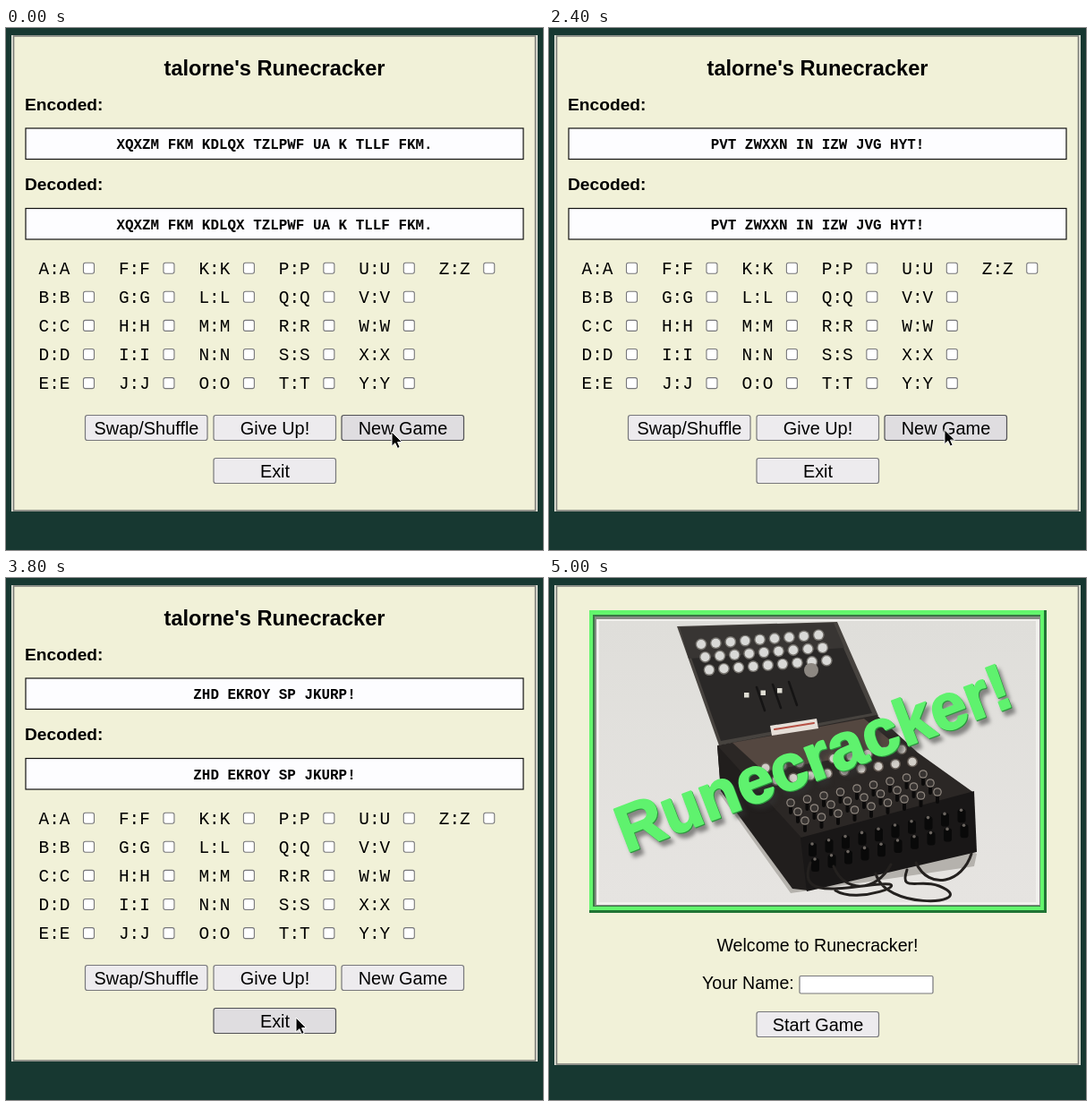
An HTML page for the animation above (5100 ms loop, 600x583 px).

```html
<!DOCTYPE html>
<html lang="en">
<head>
<meta charset="utf-8">
<title>Runecracker</title>
<style>
html, body { margin: 0; width: 100%; height: 100%; overflow: hidden; background: #173831; }
svg { display: block; }
text { font: 19.6px "Liberation Sans", Arial, sans-serif; white-space: pre; }
.mid { text-anchor: middle; }
.title { font-size: 23.6px; font-weight: bold; }
.head { font-size: 19.2px; font-weight: bold; }
.mono { font-family: "Liberation Mono", "Courier New", monospace; font-size: 19.4px; }
.code { font-size: 15.92px; font-weight: bold; }
.btn rect { fill: #edebee; stroke: #77777b; stroke-width: 1.2; }
.btn text { font-size: 19.9px; }
.btn.hover rect { fill: #dfdde0; stroke: #505054; }
.btn.press rect { fill: #f4f2f6; stroke: #8c8c90; }
.logo { font-size: 73px; font-weight: bold; stroke-width: 2; stroke-linejoin: round; }
</style>
</head>
<body>
<svg id="stage" width="600" height="583" viewBox="0 0 600 583"></svg>
<script>
const text = (x, y, s, cls = '') => `<text x="${x}" y="${y}" class="${cls}">${s}</text>`;
const rect = (x, y, w, h, fill, more = '') =>
  `<rect x="${x}" y="${y}" width="${w}" height="${h}" fill="${fill}" ${more}/>`;
const poly = (points, fill) => `<polygon points="${points}" fill="${fill}"/>`;
const dot = (x, y, r, fill) => `<circle cx="${x}" cy="${y}" r="${r}" fill="${fill}"/>`;
const line = (d, color, width) =>
  `<path d="${d}" fill="none" stroke="${color}" stroke-width="${width}" stroke-linecap="round"/>`;
const repeat = (n, draw) => Array.from({ length: n }, (_, i) => draw(i)).join('');

const button = (id, x, y, label) => `<g id="${id}" class="btn">
  ${rect(x, y, 136.5, 28, '', 'rx="2.5"')}${text(x + 68.5, y + 21, label, 'mid')}</g>`;

const panel = h => rect(6, 8, 588, h, '#e4e5da')
  + rect(8.5, 9, 583, h - 2, '#f1f1d8', 'stroke="#7c7d78" stroke-width="1.6"');

const field = y => rect(22, y, 556, 34.5, '#fdfdff', 'stroke="#111" stroke-width="1.2"')
  + text(300, y + 23, '', 'mono code mid');

const letter = i => {
  const x = 36.5 + 89.45 * Math.floor(i / 5), y = 275 + 32.1 * (i % 5);
  const c = String.fromCharCode(65 + i);
  return text(x, y, c + ':' + c, 'mono')
    + rect(x + 50, y - 12.8, 12, 12, '#fff', 'rx="2.2" stroke="#77777a" stroke-width="1.1"');
};

const game = panel(532)
  + text(300, 53, "talorne's Runecracker", 'title mid')
  + text(21, 92, 'Encoded:', 'head') + field(112)
  + text(21, 181, 'Decoded:', 'head') + field(201.5)
  + repeat(26, letter)
  + button('swap', 88.5, 432.5, 'Swap/Shuffle') + button('give', 232, 432.5, 'Give Up!')
  + button('next', 375, 432.5, 'New Game') + button('exit', 232, 480.5, 'Exit');

// Keys of the machine lie in slanted rows
const keys = (rows, cols, x, y, dx, dy, sx, sy, draw) => repeat(rows, r => repeat(cols, c =>
  draw(x + c * dx + r * sx, y + c * dy + r * sy)));

const machine =
  poly('270,352 475,322 478,308 440,292 190,240', '#b5b2ad')
  + poly('143,54 322,49 368,154 190,187', '#47433f')
  + poly('148,58 318,53 361,151 192,182', '#2a2827')
  + poly('146,55 318,50 330,78 156,90', '#383533')
  + keys(3, 9, 170, 74, 16.4, -1.3, 4.5, 14.3, (x, y) =>
      dot(x, y, 6.4, '#77746f') + dot(x, y, 5, '#d9d9d7'))
  + dot(293, 103, 8, '#8d8882')
  + repeat(3, i => rect(218 + i * 18.5, 128 - i * 2.5, 5.5, 5.5, '#e0ded4')
      + line(`M${232 + i * 18} ${122 - i * 3}l9 26`, '#151414', 2.5))
  + poly('188,187 366,153 412,195 475,240 282,292 192,238', '#2b2725')
  + poly('188,187 282,290 290,349 272,347 192,238', '#211e1d')
  + poly('281,290 475,238 478,306 288,350', '#191717')
  + poly('205,184 352,157 392,190 240,216', '#544740')
  + poly('247,165 299,157 301,168 249,176', '#e6dfd8')
  + line('M252 169L296 162', '#b75145', 2)
  + keys(2, 9, 242, 212, 19, -2.6, 12, 14, (x, y) =>
      dot(x, y, 6, '#665d56') + dot(x, y, 4.5, '#d2cec8'))
  + keys(3, 9, 270, 251, 18.5, -4, 8, 10, (x, y) =>
      line(`M${x} ${y + 3}v8`, '#0b0a0a', 4) + dot(x, y, 4.8, '#918981') + dot(x, y, 3.6, '#373331'))
  + keys(2, 10, 294, 302, 18.5, -4.2, 3, 17, (x, y) =>
      rect(x - 4, y - 6, 9, 15, '#090909', 'rx="3"') + dot(x, y - 5, 1.8, '#6c6661'))
  + line('M292 318C276 360 330 345 370 342S345 365 320 349M365 330C375 370 470 365 444 348S390 355 400 326'
      + 'M318 322C330 352 365 352 382 320M410 318C425 350 462 340 472 308', '#24211f', 3);

const logo = (color, dx) => `<text class="logo" transform="translate(${86 + dx} ${307 + dx}) rotate(-20.8)"
  fill="${color}" stroke="${color}">Runecracker!</text>`;

const picture = rect(45, 36, 511, 338, '#207434')
  + rect(45, 36, 508, 335, '#63f66d')
  + rect(49, 41, 500, 326, '#397844')
  + rect(51, 43, 498, 323, '#858c84')
  + rect(53, 46, 495, 319, '#f1f0ed')
  + rect(56, 48, 488, 314, 'url(#paper)')
  + machine
  + `<g style="filter:drop-shadow(4px 5px 2px #3338)">${logo('#2d963f', 1)}${logo('#5ff26e', 0)}</g>`;

const welcome = panel(536) + picture
  + text(300, 416.5, 'Welcome to Runecracker!', 'mid')
  + text(171, 458.5, 'Your Name:')
  + rect(280, 444.5, 149, 19.5, '#fff', 'rx="1.5" stroke="#77777b" stroke-width="1.2"')
  + button('start', 232, 484.5, 'Start Game');

const $ = id => document.getElementById(id);
$('stage').innerHTML = `<defs><linearGradient id="paper" x2="0" y2="1">
  <stop stop-color="#dfdeda"/><stop offset="1" stop-color="#e6e4e1"/></linearGradient></defs>
  ${rect(0, 0, 600, 583, '#173831')}<g id="game">${game}</g><g id="welcome">${welcome}</g>
  <path id="cursor" d="M0 0V16.2L3.8 12.7 6.5 18.5 9.2 17.3 6.6 11.6H11.6Z"
    fill="#050505" stroke="#fff" stroke-width="1"/>`;
const codes = document.querySelectorAll('.code');

// Each list holds [start time, value...]
const messages = [
  [0, 'XQXZM FKM KDLQX TZLPWF UA K TLLF FKM.'],
  [700, 'BKHZSBT OEPOOCA RSIO OEPOAA. YKQ AZKQRC IBKU HZXH, HKBY.'],
  [1900, 'PVT ZWXXN IN IZW JVG HYT!'],
  [3000, 'ZHD EKROY SP JKURP!']
];
const nextStates = [[0, 'hover'], [500, 'press'], [700, ''], [1800, 'press'], [1900, ''],
  [2400, 'hover'], [2700, 'press'], [3000, '']];
const exitStates = [[0, ''], [3700, 'hover'], [4000, 'press']];
const path = [[0, 431, 451], [400, 443, 449], [2300, 443, 449], [2700, 436, 446],
  [3300, 436, 446], [3800, 324, 491], [5100, 324, 491]];

const at = (list, t) => list.filter(e => e[0] <= t).pop()[1];

function cursorAt(t) {
  const i = path.findIndex(p => p[0] > t), [t0, x0, y0] = path[i - 1], [t1, x1, y1] = path[i];
  const k = (t - t0) / (t1 - t0), e = k * k * (3 - 2 * k);
  return [x0 + (x1 - x0) * e, y0 + (y1 - y0) * e];
}

function draw(now) {
  const t = Math.floor(now % 5100 / 100) * 100;
  const playing = t < 4100;
  $('game').style.display = playing ? '' : 'none';
  $('welcome').style.display = playing ? 'none' : '';
  codes.forEach(c => c.textContent = at(messages, t));
  $('next').setAttribute('class', 'btn ' + at(nextStates, t));
  $('exit').setAttribute('class', 'btn ' + at(exitStates, t));
  $('cursor').setAttribute('transform', `translate(${cursorAt(t)})`);
  $('cursor').style.display = t < 4400 ? '' : 'none';
}

const begin = performance.now();
function tick() {
  draw(performance.now() - begin);
  requestAnimationFrame(tick);
}
tick();
</script>
</body>
</html>
```
